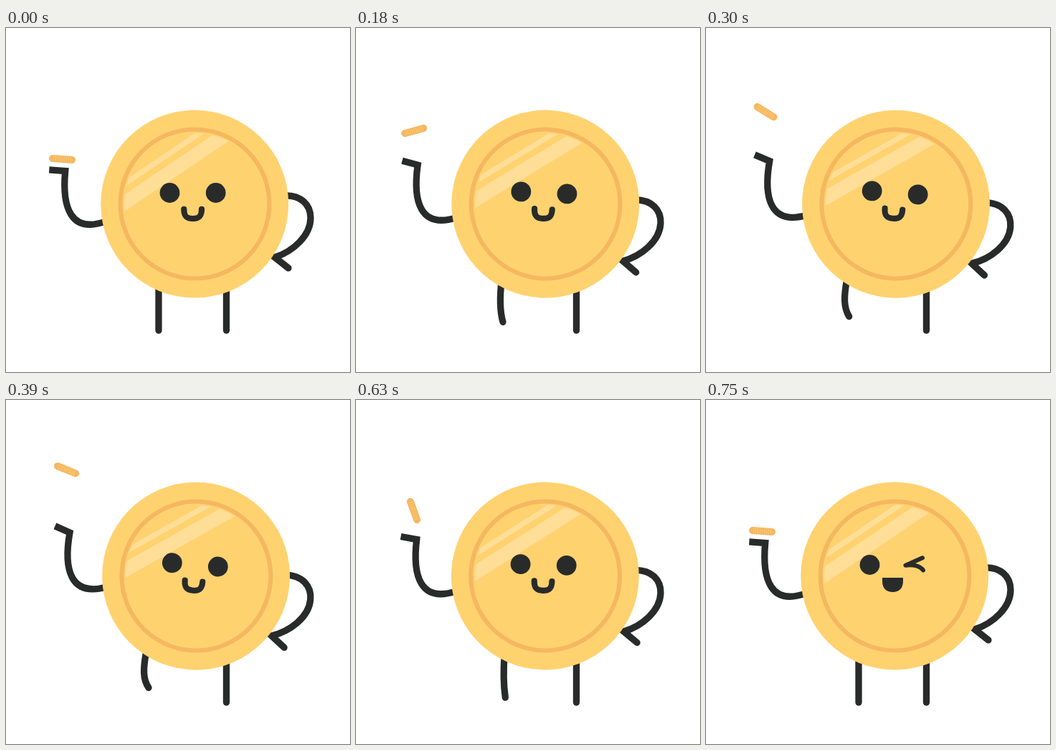
Animation, 480 px wide and 480 px high, one loop 1.5 s. Source, as an HTML page with a canvas:

```html
<!DOCTYPE html>
<html lang="en">
<head>
<meta charset="utf-8">
<title>Coin toss</title>
<style>
html, body { margin: 0; width: 100%; height: 100%; overflow: hidden; background: #fff; }
canvas { display: block; width: 100vmin; height: 100vmin; }
</style>
</head>
<body>
<canvas id="stage" width="480" height="480"></canvas>
<script>
const ctx = document.getElementById('stage').getContext('2d');
const INK = '#292b2a', GOLD = '#ffd270', RIM = '#f5b75f', SHINE = '#ffde98';
const LOOP = 1500, STEP = 30, PEAK = 390, LAND = 750, RISE = 315;
const TILT = 4.7, LIMB = 9.3;
const TAU = Math.PI * 2, DEG = Math.PI / 180;

const lerp = (a, b, k) => a + (b - a) * k;

function disc(x, y, r, fill) {
  ctx.beginPath();
  ctx.arc(x, y, r, 0, TAU);
  ctx.fillStyle = fill;
  ctx.fill();
}

function line(d, width, cap = 'round', join = 'round', color = INK) {
  ctx.lineCap = cap;
  ctx.lineJoin = join;
  ctx.lineWidth = width;
  ctx.strokeStyle = color;
  ctx.stroke(new Path2D(d));
}

// The right leg stands still, the left one swings back and lifts
function legs(k) {
  line('M307.5 355V422', LIMB);
  const hip = 213 - 17 * k, knee = hip - 5 * k;
  const foot = `${213 - 14 * k} ${422 - 20.5 * k}`;
  line(`M${hip} ${355 - 5 * k}C${knee} 375 ${knee} ${400 - 10 * k} ${foot}`, LIMB);
}

// Arms turn with the body; the tossing wrist flicks a little further
function arms(k) {
  const flick = (4 + 15 * k) * DEG, sag = 1.5 * k;
  const dx = -22.5 * Math.cos(flick), dy = -22.5 * Math.sin(flick);
  line(`M140 ${269.5 + sag}C90 ${288 + sag} 78 250 82.7 199.5l${dx} ${dy}`, LIMB, 'butt', 'miter');
  line('M386 234C412 232 425 247 425 265C425 290 400 312 375 320L394 335', LIMB, 'round', 'miter');
}

// Diagonal highlight, heights measured at x = 166
function band(top, bottom) {
  const edge = (x, y) => ctx.lineTo(x, y - 0.675 * (x - 166));
  ctx.beginPath();
  edge(146, top);
  edge(366, top);
  edge(366, bottom);
  edge(146, bottom);
  ctx.fillStyle = SHINE;
  ctx.fill();
}

function face(wink) {
  disc(228.5, 230, 13.9, INK);
  if (wink) {
    line('M302 220.3L278.5 230.7C290 229 299 232 303 237.5', 6);
    ctx.fill(new Path2D('M246 248H275V253C275 263 269 268 260.5 268S246 263 246 253Z'));
  } else {
    disc(292.7, 230, 13.9, INK);
    line('M248.3 252.8C248.3 263 252 266 260.6 266S273 263 273 252.8', 8.2);
  }
}

function coin() {
  disc(263.2, 245.6, 131, GOLD);
  ctx.save();
  ctx.beginPath();
  ctx.arc(263.8, 245.5, 99, 0, TAU);
  ctx.clip();
  band(212.5, 221.5);
  band(232, 255.3);
  ctx.restore();
  ctx.beginPath();
  ctx.arc(263.5, 245.5, 104, 0, TAU);
  ctx.lineWidth = 6;
  ctx.strokeStyle = RIM;
  ctx.stroke();
}

function tossedCoin(k) {
  ctx.save();
  ctx.translate(lerp(78.5, 84.5, k), lerp(183, 97.3, k));
  ctx.rotate(lerp(4, 742, k) * DEG);
  line('M-13.5 0H13.5', 10, 'round', 'round', RIM);
  ctx.fillStyle = '#fcc673';
  for (let x = -12; x <= 12; x += 3) ctx.fillRect(x - 0.6, -3.8, 1.2, 7.6);
  ctx.restore();
}

function draw(ms) {
  const t = Math.min(Math.floor(ms / STEP) * STEP, LAND);
  const fall = (LAND - t) / (LAND - PEAK);
  const toss = Math.min(t / PEAK, fall);
  const pose = Math.min(t / RISE, fall, 1);

  ctx.fillStyle = '#fff';
  ctx.fillRect(0, 0, 480, 480);
  legs(pose);
  ctx.save();
  ctx.translate(263.5, 269);
  ctx.rotate(TILT * DEG * pose);
  ctx.translate(-263.5, -269);
  arms(pose);
  coin();
  face(t >= LAND);
  ctx.restore();
  tossedCoin(toss);
}

const start = performance.now();
function tick() {
  draw((performance.now() - start) % LOOP);
  requestAnimationFrame(tick);
}
tick();
</script>
</body>
</html>
```
